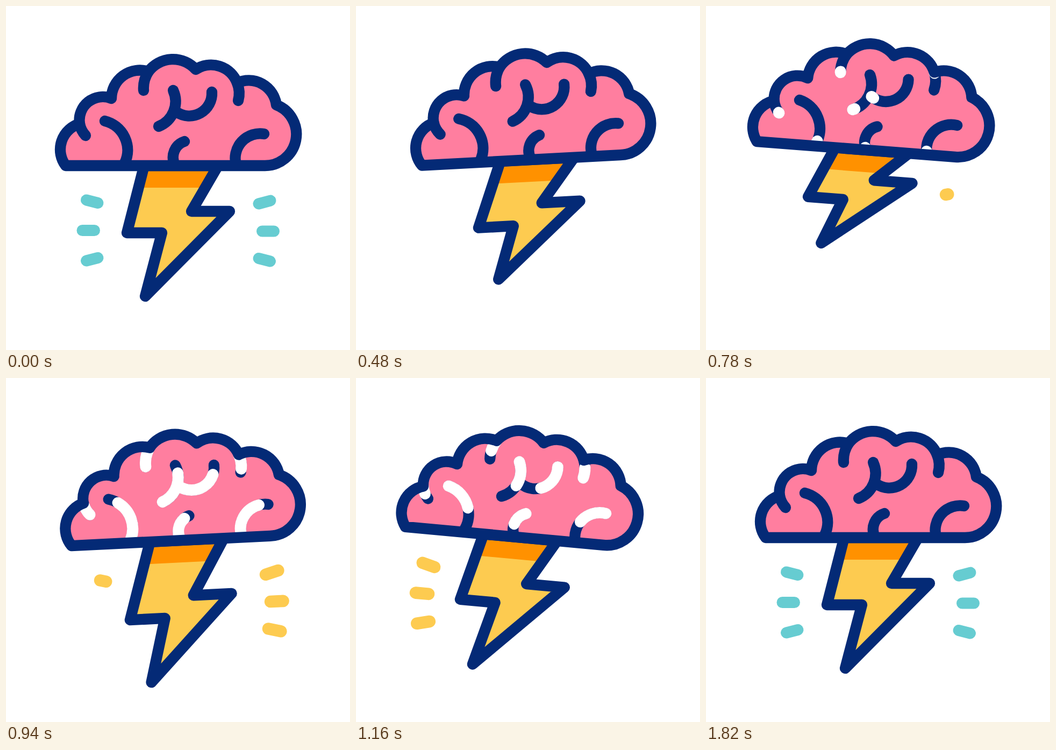
Recreate the animation shown at these times as an HTML page. Size 640 by 640 pixels, loop 2.16 s.

```html
<!DOCTYPE html>
<html lang="en">
<head>
<meta charset="utf-8">
<title>Brainstorm</title>
<style>
  html, body { margin: 0; width: 100%; height: 100%; overflow: hidden; background: #fff; }
  svg { display: block; width: 100vw; height: 100vh; }
  path, line { stroke-linecap: round; stroke-linejoin: round; }
  .ink { fill: none; stroke: #042a76; stroke-width: 20.3; }
  .glow { fill: none; stroke: #fff; stroke-width: 21; }
</style>
</head>
<body>
<svg viewBox="0 0 640 640">
  <defs><clipPath id="boltClip"><path class="boltShape"/></clipPath></defs>
  <g id="body">
    <g id="sparks"></g>
    <path class="boltShape" fill="#fdcb50"/>
    <rect x="200" y="290" width="240" height="48" fill="#ff9100" clip-path="url(#boltClip)"/>
    <path class="boltShape ink"/>
    <path class="brain" fill="#ff7e9f"/>
    <g id="folds"></g>
    <path class="brain ink"/>
  </g>
</svg>
<script>
const LOOP = 2160;
const NS = 'http://www.w3.org/2000/svg';
const $ = s => document.querySelector(s);
const all = s => document.querySelectorAll(s);

function add(parent, tag, attrs) {
  const el = document.createElementNS(NS, tag);
  for (const k in attrs) el.setAttribute(k, attrs[k]);
  return parent.appendChild(el);
}

const ease = p => (1 - Math.cos(Math.PI * Math.min(1, Math.max(0, p)))) / 2;
const ramp = (t, a, b) => ease((t - a) / (b - a));

// Eased value on a list of [time, value] keys
function track(keys, t) {
  let v = keys[0][1];
  for (let i = 1; i < keys.length; i++) {
    const [a] = keys[i - 1], [b, end] = keys[i];
    if (t > a) v += (end - v) * ramp(t, a, b);
  }
  return v;
}

const times = [240, 400, 590, 780, 950, 1160];
const hop = (...values) => times.map((t, i) => [t, values[i]]);
const lift = hop(0, -28, 16, -28, 5.3, 0);
const bendX = hop(0, -11, -21.3, -11, -12, 0);
const bendY = hop(0, -30, 38.5, -30, 18.6, 0);
const tipX = hop(0, -14, -21.3, -14, -12, 0);
const tipY = hop(0, -64, 40, -64, 18.6, 0);
const tilt = [[360, 0], [510, -3.3], [718, 5.7], [980, -3.3], [1190, 5.7], [1335, 0]];

const brain = 'M111 297A50 50 0 0 1 137 219A43.5 43.5 0 0 1 196 172A53 53 0 0 1 265 122' +
  'A57 57 0 0 1 353 118A52 52 0 0 1 430 143A52 52 0 0 1 503 184A58.5 58.5 0 0 1 481 297Z';
all('.brain').forEach(p => p.setAttribute('d', brain));

// Each fold runs in the direction the light travels
const folds = [
  'M221 292A56 56 0 0 0 184 214',
  'M284 224A50 50 0 0 0 311 157',
  'M317 197A42 42 0 0 0 383 160',
  'M314 295A31 31 0 0 1 332 252',
  'M428 295A46 46 0 0 1 480 238',
  'M430 143A52 52 0 0 1 432 176',
  'M256 157A57 57 0 0 1 265 122',
  'M148 241A43.5 43.5 0 0 1 137 219'
];
folds.forEach(d => add($('#folds'), 'path', { d, class: 'ink' }));
const glows = folds.map(d => add($('#folds'), 'path', { d, class: 'glow', pathLength: 1 }));

// Inner end, then outer end
const sparks = [
  [171, 366.5, 149.5, 361], [164.5, 417.5, 142, 417.5], [171, 468.5, 149.5, 474],
  [470, 368, 492, 362], [476.5, 419, 498.5, 419], [470, 469.5, 491.5, 475]
].map(ends => ({ ends, el: add($('#sparks'), 'line', {}) }));

const teal = { stroke: '#66ccd1', 'stroke-width': 21 };
const gold = { stroke: '#fdcb50', 'stroke-width': 22.6 };

function drawSpark({ ends: [x, y, X, Y], el }, from, to, paint, show) {
  el.style.display = show ? '' : 'none';
  const at = (a, b, p) => a + (b - a) * p;
  const attrs = {
    x1: at(x, X, from), y1: at(y, Y, from),
    x2: at(x, X, to), y2: at(y, Y, to) + 0.01, ...paint
  };
  for (const k in attrs) el.setAttribute(k, attrs[k]);
}

function updateSpark(spark, i, t) {
  if (t < 400 || t >= 1430) {
    const from = t < 400 ? ramp(t, 240, 400) : 0;
    const to = t < 400 ? 1 : ramp(t, 1440, 1820);
    drawSpark(spark, from, to, teal, true);
    return;
  }
  const left = i < 3;
  const start = (left ? 880 : 750) + (i % 3 ? 65 : 0);
  const out = left ? 1175 : 975;
  const from = ramp(t, out, out + 130);
  const to = ramp(t, start, start + 130);
  drawSpark(spark, -0.04 + from * 1.07, to * 1.03, gold, t >= start && from < 1);
}

function updateBolt(t) {
  const dx = track(bendX, t), dy = track(bendY, t);
  const points = [
    [257, 297], [225 + dx, 422 + dy], [290 + dx, 422 + dy],
    [259 + track(tipX, t), 540 + track(tipY, t)],
    [416 + dx, 382 + dy], [345 + dx, 382 + dy], [394.5, 297]
  ];
  const d = 'M' + points.map(p => p.join(' ')).join('L') + 'Z';
  all('.boltShape').forEach(p => p.setAttribute('d', d));
}

function updateGlow(t) {
  const head = ramp(t, 740, 1022), tail = ramp(t, 1030, 1320);
  glows.forEach(p => {
    p.style.display = head > tail ? '' : 'none';
    p.setAttribute('stroke-dasharray', `${head - tail} 2`);
    p.setAttribute('stroke-dashoffset', -tail);
  });
}

function draw(t) {
  $('#body').setAttribute('transform',
    `translate(0 ${track(lift, t)}) rotate(${track(tilt, t)} 320 80)`);
  updateBolt(t);
  updateGlow(t);
  sparks.forEach((s, i) => updateSpark(s, i, t));
}

const begin = performance.now();
function tick() {
  draw((performance.now() - begin) % LOOP);
  requestAnimationFrame(tick);
}
draw(0);
requestAnimationFrame(tick);
</script>
</body>
</html>
```
